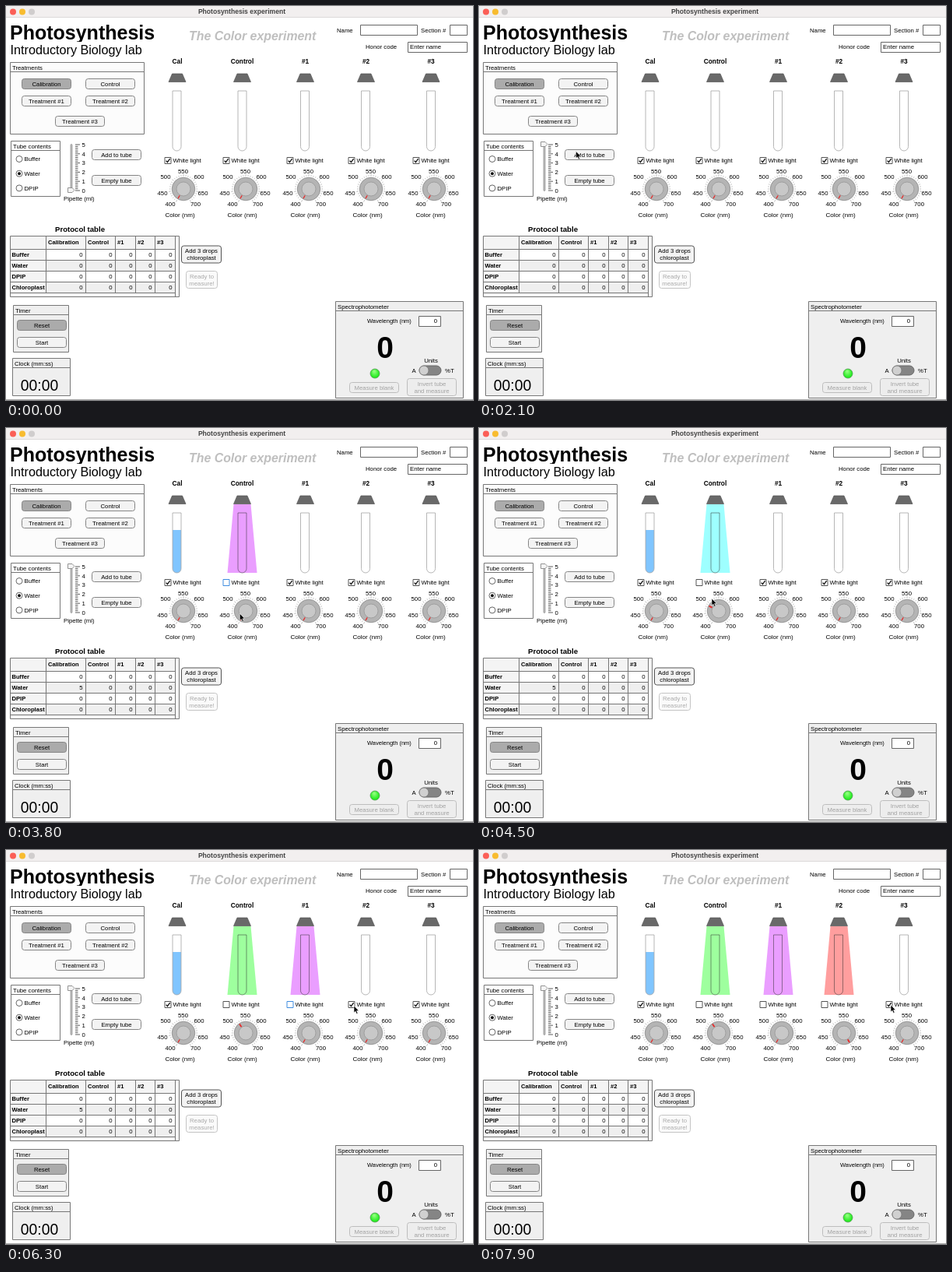
Write an HTML page with a canvas that moves like this. It is 600 px wide and 506 px high and loops after 8 s.

```html
<!DOCTYPE html>
<html lang="en">
<head>
<meta charset="utf-8">
<title>Photosynthesis experiment</title>
<style>
html, body { margin: 0; width: 100%; height: 100%; overflow: hidden; background: #fff; }
canvas { display: block; width: 600px; height: 506px; }
</style>
</head>
<body>
<canvas id="stage" width="600" height="506"></canvas>
<script>
const ctx = document.getElementById('stage').getContext('2d');
const LOOP = 8000;
const FAMILY = '"Liberation Sans", Arial, sans-serif';
const LINE = '#777';

// [ms, x, y] stops of the pointer
const POINTER = [
  [500, 150, 260], [900, 22, 214], [1000, 22, 214], [1200, 80, 184], [1450, 84, 234],
  [1500, 84, 234], [1850, 84, 177], [2250, 143, 191], [2550, 143, 191], [3150, 285, 198],
  [3450, 285, 198], [3850, 301, 240], [4050, 301, 240], [4500, 299, 219], [4800, 303, 221],
  [4900, 303, 221], [5200, 366, 200], [5850, 366, 200], [6250, 447, 200], [6700, 447, 200],
  [6950, 462, 242], [7200, 465, 222], [7500, 476, 226], [7650, 476, 226], [7850, 529, 199]
];
const PIPETTE = [[1500, 0], [1850, 5]];
const HUES = [[400, 287], [440, 240], [487, 180], [515, 120], [580, 60], [645, 0]];

// turn: [ms, nm] stops of the colour dial
const STATIONS = [
  { name: 'Cal', lamp: 220, tube: 219.5, check: 208, dial: 228 },
  { name: 'Control', lamp: 303.5, tube: 303.5, check: 283, dial: 308, lit: 3400, focusEnd: 4050,
    turn: [[4050, 400], [4500, 487], [4800, 515]] },
  { name: '#1', lamp: 384.5, tube: 384, check: 365, dial: 389, lit: 5250, focusEnd: 6500 },
  { name: '#2', lamp: 462.5, tube: 462, check: 444, dial: 469, lit: 6500, focusEnd: 6950,
    turn: [[6950, 400], [7500, 700]] },
  { name: '#3', lamp: 546, tube: 546, check: 527, dial: 550 }
];

// Eased value between [key, value...] stops
function sample(stops, key, column = 1, ease = u => u) {
  if (key <= stops[0][0]) return stops[0][column];
  for (let i = 1; i < stops.length; i++) {
    const a = stops[i - 1], b = stops[i];
    if (key < b[0]) return a[column] + (b[column] - a[column]) * ease((key - a[0]) / (b[0] - a[0]));
  }
  return stops[stops.length - 1][column];
}
const smooth = u => u * u * (3 - 2 * u);

function text(str, x, y, { size = 7.75, style = '', color = '#000', align = 'left' } = {}) {
  ctx.font = `${style} ${size}px ${FAMILY}`;
  ctx.fillStyle = color;
  ctx.textAlign = align;
  ctx.fillText(str, x, y);
}

function paint(fill, stroke, width = 1) {
  if (fill) { ctx.fillStyle = fill; ctx.fill(); }
  if (stroke) { ctx.strokeStyle = stroke; ctx.lineWidth = width; ctx.stroke(); }
}

function box(x, y, w, h, fill, stroke, radius = 0, width = 1) {
  ctx.beginPath();
  ctx.roundRect(x, y, w, h, radius);
  paint(fill, stroke, width);
}

function disc(x, y, r, fill, stroke, width) {
  ctx.beginPath();
  ctx.arc(x, y, r, 0, Math.PI * 2);
  paint(fill, stroke, width);
}

function poly(points, fill, stroke, width) {
  ctx.beginPath();
  points.forEach(([x, y]) => ctx.lineTo(x, y));
  ctx.closePath();
  paint(fill, stroke, width);
}

function line(x1, y1, x2, y2, color = LINE, width = 1) {
  ctx.beginPath();
  ctx.moveTo(x1, y1);
  ctx.lineTo(x2, y2);
  paint(null, color, width);
}

function panel(title, x, y, w, h, fill) {
  box(x, y, w, h, fill, LINE);
  line(x, y + 12, x + w, y + 12);
  text(title, x + 2.5, y + 9);
}

function button(label, x, y, w, h, { fill = '#f3f3f3', stroke = '#858585', color = '#000' } = {}) {
  box(x + .5, y + .5, w, h, fill, stroke, 3);
  const rows = label.split('\n');
  rows.forEach((row, i) =>
    text(row, x + w / 2 + .5, y + h / 2 + 3.2 + (i - (rows.length - 1) / 2) * 9.4, { color, align: 'center' }));
}

function field(x, y, w, h) { box(x + .5, y + .5, w, h, '#fff', '#666'); }

function titleBar() {
  box(0, 0, 600, 14, '#f2efef');
  line(0, 14.5, 600, 14.5, '#dcd9d9');
  ['#fb5f57', '#f8bc30', '#d0cdcd'].forEach((c, i) => disc(9 + 12 * i, 7.5, 4, c));
  text('Photosynthesis experiment', 303, 10, { size: 8.6, style: 'bold', color: '#444', align: 'center' });
  line(0, 505.5, 600, 505.5, '#aaa');
}

function header() {
  ctx.save();
  ctx.beginPath();
  ctx.rect(0, 15, 230, 31);
  ctx.clip();
  text('Photosynthesis', 5, 43, { size: 25, style: 'bold' });
  ctx.restore();
  text('Introductory Biology lab', 5.5, 61.7, { size: 16.2 });
  text('The Color experiment', 235, 44, { size: 15.9, style: 'italic bold', color: '#bfbfbf' });
  text('Name', 425, 34);
  field(455, 24, 73, 13);
  text('Section #', 533, 34);
  field(570, 24, 22, 13);
  text('Honor code', 462, 55);
  field(516, 46, 76, 13);
  text('Enter name', 519, 55);
}

function treatments() {
  panel('Treatments', 5.5, 72.5, 172, 92, '#fcfcfc');
  button('Calibration', 20, 93, 63, 13, { fill: '#ababab' });
  button('Control', 102, 93, 63, 13);
  button('Treatment #1', 20, 115, 63, 13);
  button('Treatment #2', 102, 115, 63, 13);
  button('Treatment #3', 63, 141, 63, 13);
}

function pipette(t) {
  panel('Tube contents', 6.5, 173.5, 63, 71, '#fff');
  ['Buffer', 'Water', 'DPIP'].forEach((name, i) => {
    const y = 196.5 + i * 18.7;
    disc(17, y, 4, '#fff', '#555', .9);
    if (i === 1) disc(17, y, 2, '#111');
    text(name, 23.5, y + 2.8);
  });
  box(83, 177.5, 2, 60, '#c4c4c4', '#888', 1, .7);
  for (let i = 0; i <= 25; i++) {
    const y = 237 - i * 2.36;
    line(89, y, i % 5 ? 92.5 : 95, y, '#333', .8);
    if (i % 5 === 0) text(i / 5, 97.5, y + 2.8);
  }
  const y = 236.5 - 11.8 * sample(PIPETTE, t);
  poly([[79.5, y - 3], [85, y - 3], [88, y], [85, y + 3], [79.5, y + 3]], '#f4f4f4', '#888', .9);
  text('Pipette (ml)', 74, 250);
  const pressed = t >= 2300 && t < 3400;
  button('Add to tube', 110, 184, 63, 13, pressed ? { fill: '#eef3fa', stroke: '#3f8de0' } : {});
  button('Empty tube', 110, 217, 63, 13);
}

function protocol(filled) {
  const columns = [5.5, 51.5, 102.5, 140.5, 166.5, 191.5, 217.5];
  const bold = { size: 7.6, style: 'bold' };
  text('Protocol table', 63, 290, { size: 9.6, style: 'bold' });
  box(5.5, 295.5, 217, 78, '#f4f4f4', LINE);
  ['Calibration', 'Control', '#1', '#2', '#3'].forEach((name, i) => text(name, columns[i + 1] + 2.5, 306, bold));
  ['Buffer', 'Water', 'DPIP', 'Chloroplast'].forEach((name, row) => {
    const y = 312.5 + row * 14;
    box(51.5, y, 166, 14, row % 2 ? '#efefef' : '#fff');
    line(5.5, y, 217.5, y);
    text(name, 7.5, y + 9.2, bold);
    for (let c = 1; c <= 5; c++)
      text(filled && row === 1 && c === 1 ? 5 : 0, columns[c + 1] - 4, y + 9.2, { align: 'right' });
  });
  line(5.5, 368.5, 217.5, 368.5);
  columns.slice(1).forEach(x => line(x, 295.5, x, x > 217 ? 373.5 : 368.5));
  button('Add 3 drops\nchloroplast', 225, 307.5, 51, 22, { stroke: '#555' });
  button('Ready to\nmeasure!', 231, 340, 40, 22, { fill: '#fafafa', stroke: '#c4c4c4', color: '#aaa' });
}

function instruments() {
  panel('Timer', 9.5, 384.5, 71, 60, '#efefef');
  button('Reset', 14, 403, 63, 13, { fill: '#ababab' });
  button('Start', 14, 425, 63, 13);
  panel('Clock (mm:ss)', 8.5, 452.5, 74, 48, '#efefef');
  text('00:00', 43, 494, { size: 19.3, align: 'center' });

  const faded = { fill: '#ededed', stroke: '#bdbdbd', color: '#a2a2a2' };
  panel('Spectrophotometer', 423.5, 379.5, 164, 124, '#efefef');
  text('Wavelength (nm)', 464, 407, { size: 7.5 });
  field(530, 398, 28, 13);
  text('0', 554, 407, { align: 'right' });
  text('0', 487, 452, { size: 39, style: 'bold', align: 'center' });
  const glow = ctx.createRadialGradient(473, 469, 1, 474, 472, 6.5);
  glow.addColorStop(0, '#8dff7a');
  glow.addColorStop(1, '#0be60b');
  disc(474, 472, 6, glow, '#5a9a5a', .8);
  text('Units', 546, 457.5, { align: 'center' });
  text('A', 521.5, 471);
  text('%T', 564, 471);
  box(531, 462, 28, 12, '#858585', '#666', 6);
  disc(537, 468, 6, '#d0d0d0', '#777', .8);
  button('Measure blank', 441, 483, 63, 13, faded);
  button('Invert tube\nand measure', 515, 478, 63, 22, faded);
}

// One degree per nanometre, 550 at the top
function dial(x, nm) {
  const y = 235;
  const spoke = (wave, r1, r2, color, width) => {
    const a = (wave - 280) * Math.PI / 180;
    line(x + r1 * Math.cos(a), y + r1 * Math.sin(a), x + r2 * Math.cos(a), y + r2 * Math.sin(a), color, width);
  };
  for (let wave = 400; wave <= 700; wave += 10) spoke(wave, 16.5, wave % 50 ? 18 : 19, '#888', .6);
  disc(x, y, 14.8, '#b4b4b4', '#8a8a8a', .8);
  disc(x, y, 9, '#c8c8c8', '#999', .8);
  spoke(nm, 9.5, 14, '#e82828', nm > 400 ? 1.8 : 1.2);
  [[400, -17, 22], [450, -27, 8], [500, -23, -13], [550, -.5, -20], [600, 20, -13], [650, 25, 8], [700, 15.5, 22]]
    .forEach(([wave, dx, dy]) => text(wave, x + dx, y + dy, { align: 'center' }));
  text('Color (nm)', x - 4.5, 271, { size: 8.1, align: 'center' });
}

function station(s, t) {
  const lit = t >= s.lit;
  const nm = s.turn ? sample(s.turn, t) : 400;
  if (lit) {
    const beam = [[s.lamp - 11, 98], [s.lamp + 11, 98], [s.lamp + 19, 186], [s.lamp - 19, 186]];
    poly(beam, `hsl(${sample(HUES, nm)}, 100%, 81%)`);
  }
  text(s.name, s.lamp, 74, { size: 8.3, style: 'bold', align: 'center' });
  poly([[s.lamp - 6.5, 87], [s.lamp + 6.5, 87], [s.lamp + 11, 97.5], [s.lamp - 11, 97.5]], '#696969', '#555', .7);

  const round = [0, 0, 5.5, 5.5];
  if (s.name === 'Cal' && t >= 2300) box(s.tube - 5.5, 131, 11, 55, '#80c5ff', null, round);
  box(s.tube - 5.5, 109, 11, 77, null, lit ? 'rgba(50, 50, 50, .65)' : '#a4a4a4', round, .8);

  const focused = lit && t < s.focusEnd;
  box(s.check - 4, 194.5, 8, 8, '#fff', focused ? '#3f8de0' : '#555');
  if (!lit) {
    ctx.beginPath();
    ctx.moveTo(s.check - 2.3, 198.6);
    ctx.lineTo(s.check - .6, 200.6);
    ctx.lineTo(s.check + 2.6, 196.2);
    paint(null, '#111', 1.3);
  }
  text('White light', s.check + 6.5, 201.2);
  dial(s.dial, nm);
}

function pointer(t) {
  if (t < POINTER[0][0]) return;
  const x = sample(POINTER, t, 1, smooth), y = sample(POINTER, t, 2, smooth);
  const shape = [[0, 0], [0, 9], [2, 7.2], [3.5, 10.4], [5, 9.7], [3.6, 6.6], [6.3, 6.4]];
  poly(shape.map(([dx, dy]) => [x + dx, y + dy]), '#000', '#fff', .6);
}

function draw(t) {
  ctx.fillStyle = '#fff';
  ctx.fillRect(0, 0, 600, 506);
  titleBar();
  header();
  treatments();
  pipette(t);
  protocol(t >= 2300);
  instruments();
  STATIONS.forEach(s => station(s, t));
  pointer(t);
}

function tick(now) {
  draw(now % LOOP);
  requestAnimationFrame(tick);
}
requestAnimationFrame(tick);
</script>
</body>
</html>
```
